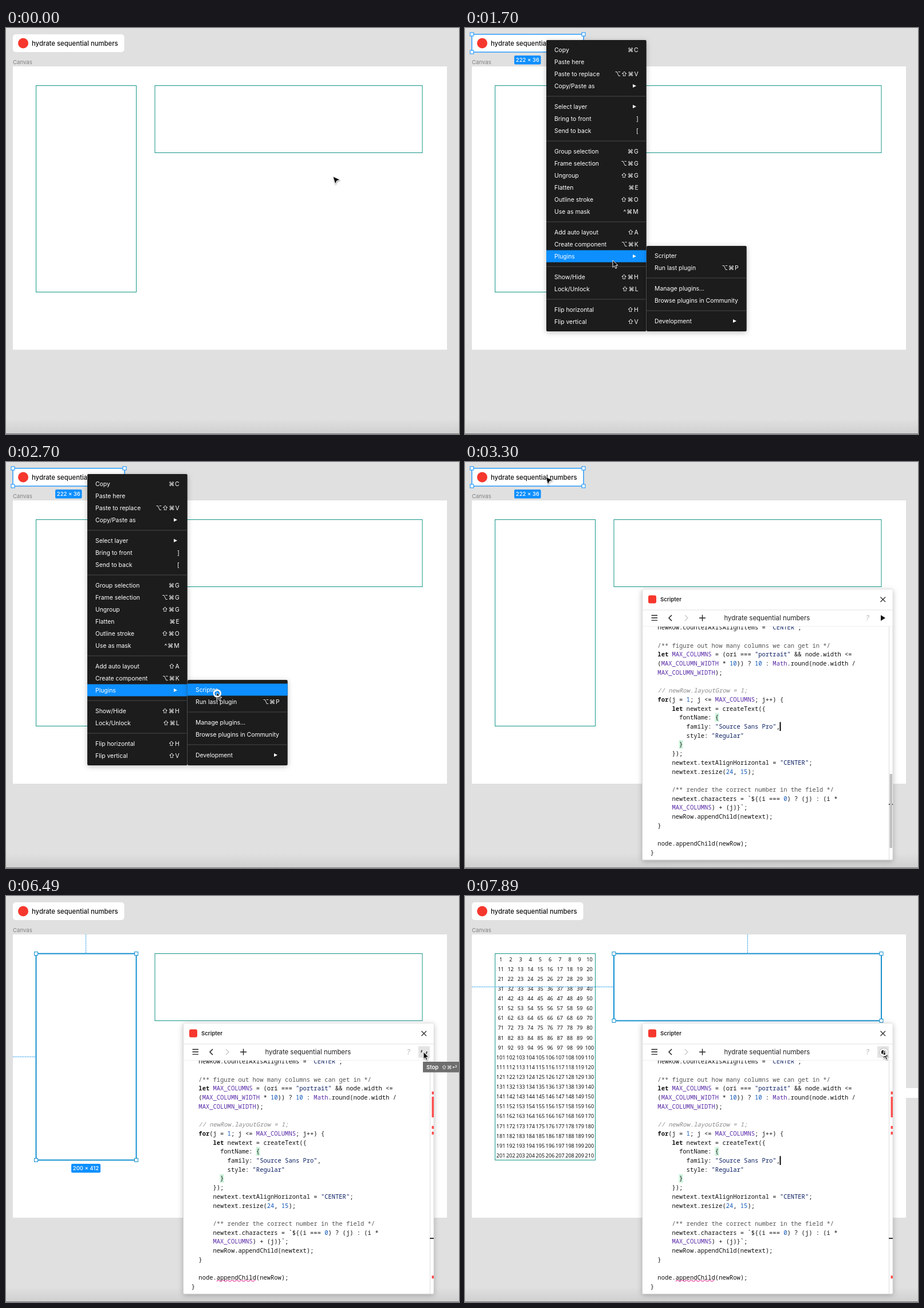
Write an HTML page that moves like this. It is 791 px wide and 708 px high and loops after 7990 ms.

```html
<!DOCTYPE html>
<html lang="en">
<head>
<meta charset="utf-8">
<title>hydrate sequential numbers</title>
<style>
  html, body { margin: 0; width: 100%; height: 100%; overflow: hidden; background: #e0e0e0; }
  svg { display: block; width: 791px; height: 708px; font-family: Inter, sans-serif; }
  text { white-space: pre; }
  .menu text { font-size: 10.4px; fill: #fff; }
  .menu .keys { text-anchor: end; letter-spacing: .8px; font-family: Inter, "DejaVu Sans", sans-serif; }
  .code text { font: 10.48px "Noto Sans Mono", "DejaVu Sans Mono", monospace; fill: #111; }
  .code .kw { font-weight: 700; }
  .code .const { fill: #5a2ca8; }
  .code .str { fill: #0b1f63; }
  .code .num { fill: #0f57b8; }
  .code .doc { fill: #555; }
  .code .line { fill: #8a8a8a; font-style: italic; }
  .cells text { font: 9.1px "Noto Sans", "Open Sans", sans-serif; text-anchor: middle; fill: #111; }
  .size { font-size: 9.5px; font-weight: 500; fill: #fff; text-anchor: middle; }
</style>
</head>
<body>
<svg id="stage" viewBox="0 0 791 708"></svg>
<script>
const LOOP = 7990;
const BLUE = '#0d8fff', SELECT = '#1490d0', TEAL = '#149688', RED = '#f6372d';
const stage = document.getElementById('stage');

const chip = { x: 12, y: 11, w: 195, h: 31 };
const tall = { x: 52.5, y: 100.5, w: 175, h: 360 };
const wide = { x: 260, y: 100.5, w: 467, h: 117 };

const esc = s => s.replace(/&/g, '&amp;').replace(/</g, '&lt;');
const rect = (x, y, w, h, fill, extra = '') =>
  `<rect x="${x}" y="${y}" width="${w}" height="${h}" fill="${fill}" ${extra}/>`;
const text = (x, y, s, extra = '') => `<text x="${x}" y="${y}" ${extra}>${esc(s)}</text>`;
const path = (d, stroke, width = 1, extra = '') =>
  `<path d="${d}" fill="none" stroke="${stroke}" stroke-width="${width}" ${extra}/>`;
const group = (id, body, extra = '') => `<g id="${id}" ${extra}>${body}</g>`;
const outline = (b, color, width) => rect(b.x, b.y, b.w, b.h, 'none', `stroke="${color}" stroke-width="${width}"`);

function handles(b, color) {
  return [0, 1, 2, 3].map(i =>
    rect(b.x + (i % 2) * b.w - 3, b.y + (i >> 1) * b.h - 3, 6, 6, '#fff', `stroke="${color}"`)).join('');
}

function sizeLabel(x, y, w, s) {
  return rect(x, y, w, 15.5, BLUE, 'rx="2"') + text(x + w / 2, y + 11.2, s, 'class="size"');
}

function guides(b) {
  const cx = Math.round(b.x + b.w / 2) - .5, cy = Math.round(b.y + b.h / 2) - .5;
  return path(`M${cx} 67V${b.y}M12 ${cy}H${b.x}`, '#2a9de8', 1, 'stroke-dasharray="2 1"');
}

// Menu entries are "label|shortcut"; '>' marks a submenu, '-' a divider.
const MENU = ['Copy|⌘C', 'Paste here', 'Paste to replace|⌥⇧⌘V', 'Copy/Paste as|>', '-',
  'Select layer|>', 'Bring to front|]', 'Send to back|[', '-',
  'Group selection|⌘G', 'Frame selection|⌥⌘G', 'Ungroup|⇧⌘G', 'Flatten|⌘E',
  'Outline stroke|⇧⌘O', 'Use as mask|^⌘M', '-',
  'Add auto layout|⇧A', 'Create component|⌥⌘K', 'Plugins|>', '-',
  'Show/Hide|⇧⌘H', 'Lock/Unlock|⇧⌘L', '-', 'Flip horizontal|⇧H', 'Flip vertical|⇧V'];
const SUBMENU = ['Scripter', 'Run last plugin|⌥⌘P', '-',
  'Manage plugins...', 'Browse plugins in Community', '-', 'Development|>'];

function menu(items, x, top, rows, hoverId) {
  let y = top + 17, body = '';
  for (const item of items) {
    if (item === '-') {
      body += rect(x, y - 3.5, 175, 1, '#484848');
      y += 15;
      continue;
    }
    const [label, keys] = item.split('|');
    body += text(x + 14, y + 4, label);
    if (keys === '>') body += `<path d="M${x + 151} ${y - 3}l6 3l-6 3z" fill="#fff"/>`;
    else if (keys) body += text(x + 161.5, y + 4, keys, 'class="keys"');
    rows.push(y);
    y += 21;
  }
  return rect(x, top, 174.7, 529 - top, '#1e1e1e', 'rx="2" filter="url(#shadow)"') +
    rect(x, 0, 174.7, 21, BLUE, `id="${hoverId}"`) + body;
}

const CODE = `  newRow.counterAxisAlignItems = "CENTER";

  /** figure out how many columns we can get in */
  let MAX_COLUMNS = (ori === "portrait" && node.width <=
  (MAX_COLUMN_WIDTH * 10)) ? 10 : Math.round(node.width /
  MAX_COLUMN_WIDTH);

  // newRow.layoutGrow = 1;
  for(j = 1; j <= MAX_COLUMNS; j++) {
      let newtext = createText({
        fontName: {
          family: "Source Sans Pro",
          style: "Regular"
        }
      });
      newtext.textAlignHorizontal = "CENTER";
      newtext.resize(24, 15);

      /** render the correct number in the field */
      newtext.characters = \`\${(i === 0) ? (j) : (i *
      MAX_COLUMNS) + (j)}\`;
      newRow.appendChild(newtext);
  }

  node.appendChild(newRow);
}`;
const TOKEN = /(\/\*\*.*)|(\/\/.*)|("[^"]*")|(\b(?:let|for)\b)|(\bMAX_\w+|\bMath\b)|(\b\d+\b)/g;
const KINDS = ['doc', 'line', 'str', 'kw', 'const', 'num'];

function codeLine(line, i) {
  const body = esc(line).replace(TOKEN, (m, ...g) =>
    `<tspan class="${KINDS[g.findIndex((v, k) => k < 6 && v)]}">${m}</tspan>`);
  return `<text x="323.8" y="${(292.2 + i * 15.71).toFixed(2)}">${body}</text>`;
}

function scripter() {
  let squiggle = 'M368 672';
  for (let i = 0; i < 17; i++) squiggle += `l2 ${i % 2 ? 2 : -2}l2 0`;
  const marks = [[341, 5], [350, 36], [401, 5], [411, 5], [662, 5]];
  return rect(309.5, 222, 437.5, 472, '#fff', 'rx="2" stroke="#c4c4c4" stroke-width=".6" filter="url(#shadow)"') +
    rect(436.5, 438, 7, 15, '#cdf2dc') + rect(373.5, 485, 7, 15, '#cdf2dc') +
    `<g class="code" clip-path="url(#editor)">${CODE.split('\n').map(codeLine).join('')}</g>` +
    rect(549.5, 453.5, 2, 15.5, '#000', 'id="caret"') +
    path('M740.5 287V694', '#ddd') + rect(740, 596, 7, 2, '#333') +
    rect(741.5, 544, 4.5, 129, '#c0c0c0', 'id="thumb"') +
    group('errors', marks.map(([y, h]) => rect(743.5, y, 3.5, h, '#ff5050')).join('') +
      path(squiggle, '#e0409a', 1.1)) +
    rect(310, 222.5, 436.5, 64, '#fff') + path('M310 258H747', '#e2e2e2') + path('M310 286.5H747', '#f0f0f0') +
    rect(320, 232.5, 14, 14, RED, 'rx="3"') +
    text(341, 243, 'Scripter', 'font-size="9.6" font-weight="600" fill="#222"') +
    path('M725.5 235.5l8.5 8.5m0 -8.5l-8.5 8.5', '#222', 1.1) +
    path('M325.5 267.5h10.5m-10.5 4.3h10.5m-10.5 4.3h10.5M409 272h11m-5.5 -5.5v11', '#222', 1.4) +
    path('M361 267l-5 5l5 5', '#222', 1.5) + path('M384 267l5 5l-5 5', '#c4c4c4', 1.3) +
    text(452.5, 276, 'hydrate sequential numbers', 'font-size="11.4" fill="#222"') +
    text(700, 276, '?', 'font-size="11.5" font-style="italic" fill="#b5b5b5"') +
    rect(720, 262, 20, 20, '#e4e4e4', 'id="button" rx="1"') +
    '<path id="play" d="M726 267l8 5l-8 5z" fill="#111"/>' +
    group('spinner', path('M-4.3 -2A4.7 4.7 0 0 0 -4.3 2M4.3 -2A4.7 4.7 0 0 1 4.3 2', '#333', 1.8));
}

let cells = '';
for (let n = 0; n < 210; n++) {
  cells += text((62.6 + n % 10 * 17.2).toFixed(1), (113.5 + Math.floor(n / 10) * 17.12).toFixed(1), `${n + 1}`);
}

const mainRows = [], subRows = [];
stage.innerHTML = `<defs>
  <filter id="shadow" x="-20%" y="-20%" width="140%" height="140%">
    <feDropShadow dx="0" dy="2" stdDeviation="5" flood-opacity=".25"/></filter>
  <filter id="soft" x="-60%" y="-60%" width="220%" height="220%">
    <feDropShadow dx=".5" dy="1.2" stdDeviation="1.2" flood-opacity=".45"/></filter>
  <linearGradient id="floor" x2="0" y2="1"><stop stop-color="#e0e0e0"/><stop offset="1" stop-color="#d0d0d0"/></linearGradient>
  <clipPath id="editor"><rect x="310" y="287" width="430" height="406"/></clipPath></defs>` +
  rect(0, 0, 791, 708, '#e0e0e0') + rect(0, 682, 791, 25, 'url(#floor)') + rect(0, 707, 791, 1, '#777') +
  text(12, 63, 'Canvas', 'font-size="9.6" fill="#808080"') +
  rect(12, 67, 758, 494, '#fff') +
  rect(12, 11, 194.5, 31, '#fff', 'rx="5"') + `<circle cx="30" cy="26.5" r="9" fill="${RED}"/>` +
  text(45, 30.6, 'hydrate sequential numbers', 'font-size="11.3" font-weight="500" fill="#111"') +
  outline(tall, TEAL, 1) + outline(wide, TEAL, 1) +
  group('cells', cells, 'class="cells"') +
  rect(770, 335, 21, 17, '#fff', 'id="strip"') +
  [chip, tall, wide].map((b, i) => group('hover' + i, outline(b, SELECT, 2))).join('') +
  group('sel0', outline(chip, BLUE, 1.3) + handles(chip, BLUE) + sizeLabel(86, 48, 46.5, '222 × 36')) +
  group('sel1', outline(tall, SELECT, 2) + handles(tall, SELECT) + sizeLabel(114, 467, 51, '200 × 412')) +
  group('sel2', outline(wide, SELECT, 2) + handles(wide, SELECT)) +
  group('guide1', guides(tall)) + group('guide2', guides(wide)) +
  group('win', scripter()) +
  group('menu', menu(MENU, 142, 21, mainRows, 'mainHover'), 'class="menu"') +
  group('submenu', menu(SUBMENU, 317, 380, subRows, 'subHover'), 'class="menu"') +
  group('tip', rect(728, 289, 63, 18.5, '#6e6e6e') +
    text(734, 302, 'Stop', 'font-size="9.6" font-weight="600" fill="#fff"') +
    text(760.5, 302, '⇧⌘⏎', 'font-size="9" fill="#fff" font-family="Inter, DejaVu Sans, sans-serif"')) +
  group('cursor',
    '<path id="wedge" d="M0 0L12 5.6L6.4 7.6L4 13.4Z" fill="#000" stroke="#fff" stroke-width=".8" filter="url(#soft)"/>' +
    '<path id="arrow" d="M0 0V12.4L2.9 9.8L4.9 14.4L7 13.5L5 9H9Z" fill="#111" stroke="#fff" stroke-width=".9" filter="url(#soft)"/>') +
  group('ring', '<circle r="5.8" fill="none" stroke="#8a8a8a" stroke-width="3.8" opacity=".6"/>' +
    '<circle r="5.8" fill="none" stroke="#fff" stroke-width="2.4"/>');

const el = {};
stage.querySelectorAll('g[id], rect[id], path[id]').forEach(e => el[e.id] = e);
const show = (id, on) => el[id].setAttribute('visibility', on ? 'inherit' : 'hidden');
const move = (id, x, y, more = '') => el[id].setAttribute('transform', `translate(${x} ${y})${more}`);
const between = (t, a, b) => t >= a && t < b;
const inside = (b, x, y) => x > b.x && x < b.x + b.w && y > b.y && y < b.y + b.h;

// Pointer stops: time, x, y
const STOPS = [[0, 571, 259], [120, 571, 259], [820, 141, 26], [1050, 141, 26], [1600, 258, 405],
  [1850, 258, 405], [2450, 368, 402], [2800, 368, 402], [2800, 141, 26], [3400, 141, 26],
  [3850, 150, 250], [4150, 150, 250], [4680, 729, 272], [6690, 729, 272], [7050, 600, 165],
  [7400, 600, 165], [7780, 730.5, 271], [LOOP, 730.5, 271]];

function pointer(t) {
  const i = STOPS.findIndex(s => s[0] > t);
  const [t0, x0, y0] = STOPS[i - 1], [t1, x1, y1] = STOPS[i];
  const p = (t - t0) / (t1 - t0), e = p * p * (3 - 2 * p);
  return [x0 + (x1 - x0) * e, y0 + (y1 - y0) * e];
}

function highlight(id, rows, y) {
  const row = rows.find(r => Math.abs(r - y) <= 10.5);
  show(id, row !== undefined);
  if (row !== undefined) el[id].setAttribute('y', row - 10.5);
}

function draw(t) {
  const [x, y] = pointer(t);
  const menuOpen = between(t, 980, 2800), subOpen = between(t, 1560, 2800);
  const winOpen = t >= 2880;
  const selected = between(t, 850, 3870) ? 0 : between(t, 3870, 7200) ? 1 : t >= 7200 ? 2 : -1;
  const overWin = winOpen && x > 309 && y > 222;

  [chip, tall, wide].forEach((b, i) => {
    show('sel' + i, selected === i);
    show('hover' + i, selected !== i && !menuOpen && !overWin && inside(b, x, y));
  });
  show('guide1', selected === 1);
  show('guide2', selected === 2);
  show('cells', t >= 6640);
  show('strip', t >= 7860);

  show('menu', menuOpen);
  show('submenu', subOpen);
  if (menuOpen) highlight('mainHover', mainRows, subOpen ? 397 : x > 142 ? y : -99);
  else show('mainHover', false);
  if (subOpen) highlight('subHover', subRows, x > 317 ? y : -99);
  else show('subHover', false);

  const running = between(t, 4780, 6640);
  show('win', winOpen);
  show('thumb', winOpen && t < 3600);
  show('errors', winOpen && t >= 3870);
  show('button', winOpen && x > 720 && overWin);
  show('play', winOpen && !running);
  show('spinner', winOpen && running);
  move('spinner', 730, 272, ` rotate(${(t - 6490) * .45 + 15})`);
  show('tip', between(t, 5450, 6720));

  // The caret is thin and grey while the canvas has the focus.
  const blurred = between(t, 3870, 4950) || between(t, 7200, 7850);
  const since = t < 3870 ? t - 2900 : t < 7200 ? t - 4980 : t - 7850;
  show('caret', winOpen && (blurred || Math.floor(since / 500) % 2 === 0));
  el.caret.setAttribute('width', blurred ? 1 : 2);
  el.caret.setAttribute('fill', blurred ? '#b0b0b0' : '#000');

  const native = menuOpen || overWin;
  move('cursor', x, y);
  show('wedge', !native);
  show('arrow', native);
  move('ring', x + .8, y + 1.5);
  show('ring', between(t, 2600, 2790) || between(t, 4690, 4850) || t >= 7830);
}

function tick() {
  draw(performance.now() % LOOP);
  requestAnimationFrame(tick);
}
tick();
</script>
</body>
</html>
```
